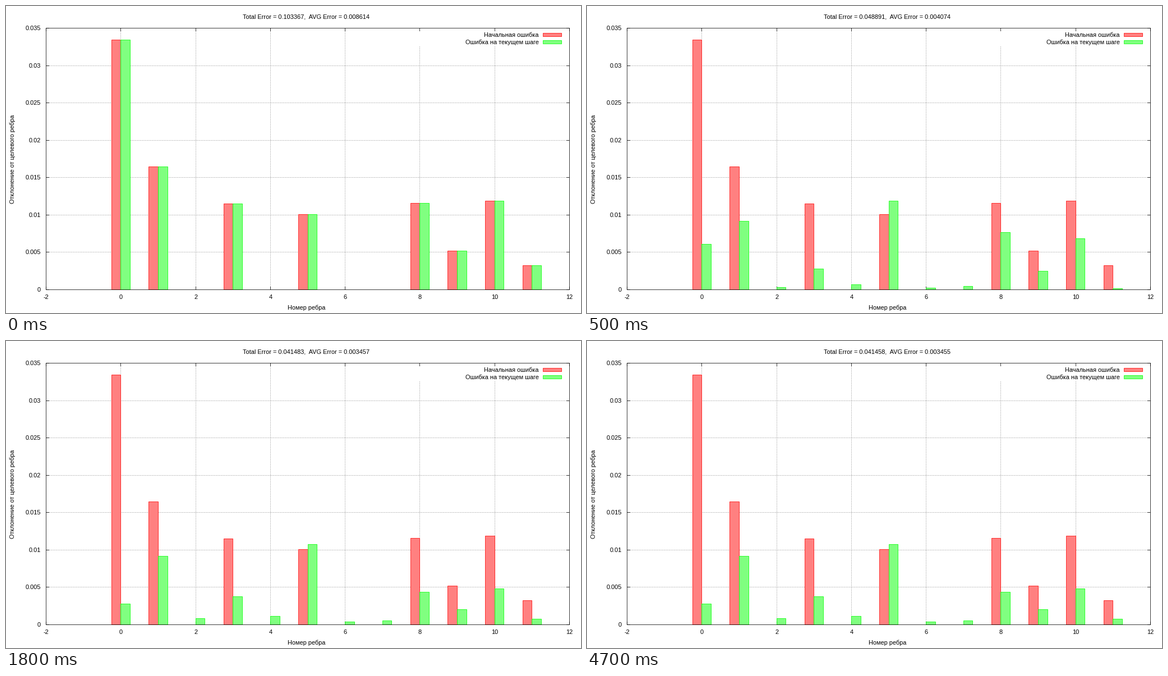
These frames come from a looping animation (1025 px wide and 547 px high, 5 s). A matplotlib script:

```python
import numpy as np
import matplotlib.pyplot as plt
from matplotlib.animation import FuncAnimation
from matplotlib.patches import Rectangle

W, H, DPI = 1025, 547, 64
PT = 72 / DPI  # one pixel in points
LINE = 0.75 * PT
LEFT, RIGHT, TOP, BOTTOM = 71, 1004, 39, 505
TICK = 5.5
RED, GREEN = ("#ff8080", "#ff0000"), ("#80ff80", "#00ff00")

plt.rcParams.update({"font.family": "Liberation Sans", "font.size": 11 * PT,
                     "path.snap": False, "toolbar": "None"})

# Key poses: bar heights in pixels for edges 0..11, then the total error.
START = np.array([445, 219, 0, 153, 0, 134, 0, 0, 154, 69, 158, 43, 0.103367])
JUMP = np.array([162, 74, 1, 17, 5, 436, 5, 2, 33, 123, 283, 180, 0.099308])
MIDWAY = np.array([81, 122, 4, 37, 9, 158, 3, 6, 102, 33, 91, 2, 0.048891])
SETTLED = np.array([37, 122, 11, 50, 15, 143, 5, 7, 58, 27, 64, 10, 0.041458])

MIDWAY_STEP, LAST_STEP = 5, 32
CHANGES = (0, 1, *range(3, 11), 12, 15, 18, 31, LAST_STEP)


def pose(step):
    step = max(s for s in CHANGES if s <= step)
    if step == 0:
        return START
    if step < MIDWAY_STEP:
        left = ((MIDWAY_STEP - max(step, 2)) / 3) ** 2
        return MIDWAY + (JUMP - MIDWAY) * left
    # Fast convergence with a long, thin tail.
    s, span = step - MIDWAY_STEP, LAST_STEP - MIDWAY_STEP
    return SETTLED + (MIDWAY - SETTLED) * (1 - s / span) / (1 + 12 * s)


def px(value):
    return round(LEFT + (value + 2) * (RIGHT - LEFT) / 14) + 0.5


def py(value):
    return round(BOTTOM - value / 0.035 * (BOTTOM - TOP)) + 0.5


fig = plt.figure(figsize=(W / DPI, H / DPI), dpi=DPI, facecolor="white")
ax = fig.add_axes([0, 0, 1, 1])
ax.set(xlim=(0, W), ylim=(H, 0))
ax.axis("off")


def line(xs, ys):
    ax.plot(xs, ys, color="black", lw=LINE, zorder=2, solid_capstyle="butt")


def grid_line(xs, ys):
    ax.plot(xs, ys, color="#808080", lw=PT, zorder=1, dashes=(1, 2),
            dash_capstyle="butt")


def box(x0, y0, x1, y1, colors, z=3):
    fill, edge = colors
    return ax.add_patch(Rectangle((x0, y0), x1 - x0, y1 - y0, fc=fill, ec=edge,
                                  lw=LINE, zorder=z))


def text(x, y, s, ha="center", **style):
    return ax.text(x, y, s, ha=ha, va="baseline", zorder=6, **style)


x0, x1, y0, y1 = LEFT + 0.5, RIGHT + 0.5, TOP + 0.5, BOTTOM + 0.5

for v in range(-2, 13, 2):
    x = px(v)
    if -2 < v < 12:
        # The grid stays clear of the legend.
        grid_line([x, x], [y1, 72.5 if v >= 8 else y0])
    line([x, x], [y1, y1 - TICK])
    line([x, x], [y0, y0 + TICK])
    text(x, 522, str(v))

for n in range(8):
    v = n * 0.005
    y = py(v)
    if 0 < n < 7:
        grid_line([x0, x1], [y, y])
    line([x0, x0 + TICK], [y, y])
    line([x1, x1 - TICK], [y, y])
    text(62, y + 3.5, f"{v:.3g}", "right")

box(x0, y0, x1, y1, ("none", "black"), 5)

text(535.5, 541, "Номер ребра")
text(15, 272.5, "Отклонение от целевого ребра", rotation=90,
     rotation_mode="anchor")
for y, label, colors in ((51.5, "Начальная ошибка", RED),
                         (64.5, "Ошибка на текущем шаге", GREEN)):
    text(949.5, y + 3.5, label, "right")
    box(957.5, y - 3, 990.5, y + 3, colors)

for i, h in enumerate(START[:-1]):
    if h:
        box(px(i - 0.25), y1 - h, px(i), y1, RED)
bars = [box(px(i), y1, px(i + 0.25), y1, GREEN, 4) for i in range(12)]
title = text(535.5, 23, "")


def update(step):
    *heights, total = pose(step)
    for bar, h in zip(bars, np.round(heights)):
        bar.set_y(y1 - h)
        bar.set_height(h)
        bar.set_visible(h > 0)
    title.set_text(f"Total Error = {total:.6f},  AVG Error = {total / 12:.6f}")
    return [*bars, title]


anim = FuncAnimation(fig, update, frames=50, interval=100, repeat=True,
                     repeat_delay=0, blit=False)
plt.show()
```
